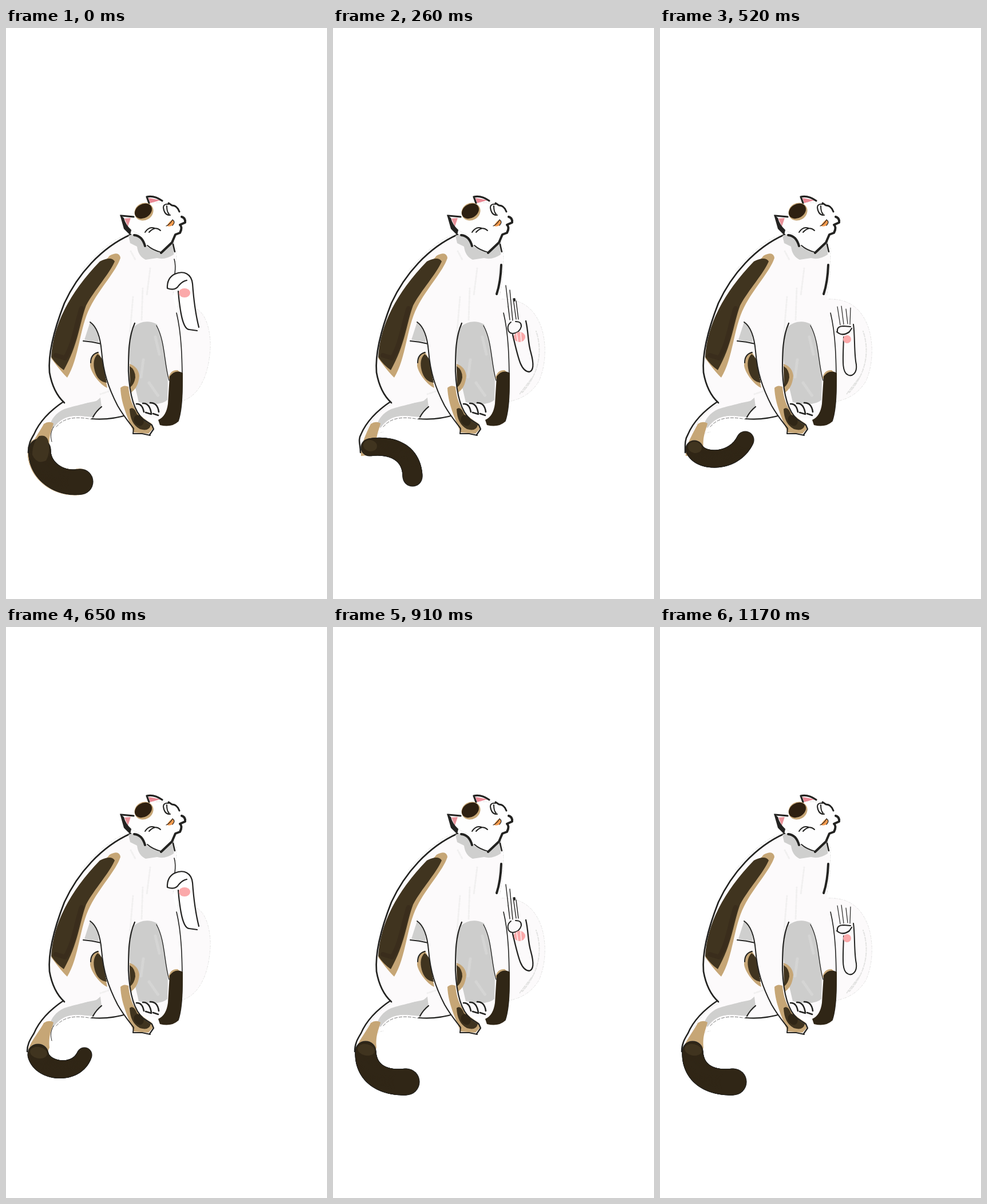
An HTML page with a canvas that plays this animation: 561 px wide and 998 px high, repeating every 1.3 s.

```html
<!DOCTYPE html>
<html lang="en">
<head>
<meta charset="utf-8">
<title>Scratching cat</title>
<style>
html, body { margin: 0; width: 100%; height: 100%; overflow: hidden; background: #fff }
canvas { display: block; width: 561px; height: 998px }
</style>
</head>
<body>
<canvas id="stage" width="561" height="998"></canvas>
<script>
const ctx = document.getElementById('stage').getContext('2d');
const INK = '#232321', FUR = '#fcfafb', DARK = '#302616', BROWN = '#40341f',
      TAN = '#c6a676', SHADE = '#cfcfce', FAINT = '#e2e2e1', PINK = '#fba9aa';
const STEP = 130;

function fill(color, d) {
  ctx.fillStyle = color;
  ctx.fill(new Path2D(d));
}
function line(d, width = 2, color = INK, dash = []) {
  ctx.strokeStyle = color;
  ctx.lineWidth = width;
  ctx.setLineDash(dash);
  ctx.stroke(new Path2D(d));
}
function oval(color, x, y, rx, ry, turn = 0) {
  ctx.fillStyle = color;
  ctx.beginPath();
  ctx.ellipse(x, y, rx, ry, turn, 0, 7);
  ctx.fill();
}
const grain = (d, width = 1, color = FAINT) => line(d, width, color, [1, 3, 3, 2]);
const mix = (a, b, t) => a.map((v, i) => v + (b[i] - v) * t);

// Tail tip: four Bezier points, then the radius at its root and at its end.
const hang = [57, 742, 57, 783, 91, 798, 128, 795, 18, 23];
const low = [59, 737, 57, 773, 93, 799, 130, 793, 19, 22];
const wave = [60, 738, 81, 757, 112, 742, 130, 786, 17, 18];
const arch = [64, 733, 103, 727, 138, 742, 139, 784, 15, 17];
const curl = [60, 736, 70, 760, 129, 762, 149, 720, 15, 15];
const hook = [56, 747, 62, 777, 122, 786, 137, 748, 18, 13];
const tails = [low, wave, arch, mix(arch, curl, .5), curl, hook, mix(hook, hang, .6), hang, hang, hang];

function tailTip(p, color, grow = 0, dx = 0) {
  for (let i = 0; i <= 60; i++) {
    const t = i / 60, u = 1 - t;
    const at = k => u * u * u * p[k] + 3 * u * u * t * p[k + 2] + 3 * u * t * t * p[k + 4] + t * t * t * p[k + 6];
    const r = p[8] + (p[9] - p[8]) * t + grow;
    oval(color, at(0) + dx, at(1), r, r);
  }
}

function drawTail(step) {
  const p = tails[step], left = p[0] - p[8] - 1;
  const edge = `C75 670 57 691 49 710 C43 720 ${left} 728 ${left} 742`;
  fill(FUR, `M102 652 ${edge} L74 738 C73 715 82 698 98 687 C118 677 137 682 154 682 L165 648Z`);
  fill(SHADE, 'M165 646 C150 655 120 660 102 666 C86 673 80 684 76 694 L83 699 C94 683 108 677 128 678 L152 680 L168 663Z');
  fill(TAN, `M66 692 Q75 686 83 691 C80 704 74 714 76 735 L${p[0] + 16} 745 L${left + 1} 748 C${left} 730 57 710 66 692Z`);
  if (step === 0) tailTip(p, TAN, 1, -1);
  tailTip(p, INK, .6);
  tailTip(p, DARK, -.6);
  if (step === 0) fill(BROWN, 'M58 713 Q71 710 74 722 Q78 742 70 756 Q54 764 46 746 Q46 725 58 713Z');
  else oval(BROWN, p[0] + 1, p[1] - 3, p[8] - 3, 10, .2);
  line('M102 652 ' + edge, 2.5);
  if (step % 5) grain('M104 657 C80 668 65 688 57 705 M79 708 L88 706');
  else line('M83 697 C77 708 78 715 80 723', 1);
  line('M88 697 C100 682 120 678 150 684', 1, '#777', [5, 3]);
}

function drawBelly(pose) {
  const d = pose < 2
    ? `M300 470 L${pose ? 339 : 333} ${pose ? 466 : 491} C352 501 358 535 357 560 C354 613 334 645 307 652Z`
    : 'M291 474 C330 472 352 490 364 523 C373 550 373 587 360 617 C347 639 328 649 307 653Z';
  fill(FUR, d);
  grain(d);
  if (pose > 1) grain('M355 530 C365 560 364 600 330 638 M349 610 L326 640', 2);
}

function drawBody() {
  fill(FUR, 'M216 362 C150 395 95 470 80 560 C72 600 85 640 104 656 Q130 660 165 650 L150 682 L188 684 L222 678 L270 684 L306 660 C310 580 307 530 299 495 L291 468 C296 440 298 400 293 376 L243 378Z');
  grain('M213 361 C185 368 155 398 132 424 M298 385 L297 430 L292 466');
  grain('M239 455 L237 510 M222 470 L216 540 M252 420 L246 468 M218 390 L226 405 M165 640 L200 628', 3, '#f1f0f0');

  fill(TAN, 'M181 398 Q198 389 200 402 C192 426 165 453 147 488 C128 525 128 577 107 611 Q97 602 79 577 Q94 500 181 398Z');
  fill(BROWN, 'M164 408 Q184 398 190 408 C180 431 155 457 140 485 C128 518 126 554 101 598 Q88 589 79 575 Q84 491 164 408Z');
  line('M132 490 C122 520 118 555 103 577 L87 572', 8, '#3a2d1c');
  line('M218 361 C166 384 125 431 102 481 C86 522 73 565 76 602 C81 630 91 645 102 655', 2.7);

  // Haunch
  fill(SHADE, 'M147 514 C157 520 162 535 162 549 L137 545Z');
  line('M135 547 Q150 548 166 552', 2);
  fill(TAN, 'M160 566 C170 577 172 603 177 629 C166 625 149 604 147 590 Q147 570 160 566Z');
  fill(BROWN, 'M160 570 Q169 575 171 590 L176 620 Q160 618 155 599 Q150 580 160 570Z');
  line('M161 567 Q148 570 148 585', 2);
  fill(SHADE, 'M122 669 Q149 662 165 646 L167 663 L152 679Z');
  line('M167 662 Q158 669 152 680 M150 683 Q182 686 216 675', 2.2);

  // Shade between the front legs
  fill('#cdcdcc', 'M224 522 C238 508 266 511 272 528 C280 560 285 600 282 650 Q270 662 232 654 C225 620 211 580 216 546Z');
  line('M240 580 L236 610 M261 540 L268 570 M250 620 L266 643', 5, '#d5d5d4', [2, 3]);
  fill(TAN, 'M216 587 Q231 592 233 608 Q231 630 217 638Z');
  fill(BROWN, 'M216 591 Q226 597 226 611 Q224 623 217 628Z');

  // Left front leg
  fill(FUR, 'M147 514 C171 535 166 590 178 625 L222 708 L250 711 L257 698 C231 684 217 660 215 620 L215 560 L200 530Z');
  fill(TAN, 'M200 629 Q206 623 214 627 C217 658 227 675 254 691 L258 699 L249 709 L223 707 C217 690 201 660 200 629Z');
  fill(BROWN, 'M216 666 Q223 660 229 675 Q240 686 253 694 Q250 706 234 701 Q217 692 216 666Z');
  oval(DARK, 232, 686, 8, 10, -.6);
  line('M147 514 C160 523 165 542 167 565 C170 602 179 629 195 660 C207 681 219 694 223 700 L222 709 L238 709 L252 712', 2);
  line('M225 516 C214 540 214 570 214 600 C216 645 226 672 240 684 Q249 690 255 694 L258 701 L251 711', 2.2);

  // Toes
  line('M228 657 Q238 656 241 671 M239 656 Q251 655 254 674 M252 655 Q265 655 267 671 M244 672 L254 675 M257 674 L266 677', 2.6);

  // Right front leg
  fill(FUR, 'M263 520 C280 550 278 590 285 625 L308 620 C309 570 305 525 299 497Z');
  line('M263 520 C278 547 276 584 285 616', 1.3);
  line('M298 498 C307 535 308 580 308 625 Q308 667 301 687', 1.6);
  fill(TAN, 'M284 612 Q287 597 300 598 L308 605 L290 615Z');
  fill(DARK, 'M286 609 Q296 596 309 603 C309 635 308 666 301 688 Q289 699 269 694 L266 685 Q280 679 283 657Z');
}

function drawHead() {
  fill(SHADE, 'M214 363 Q229 357 241 370 L246 382 Q266 394 282 381 L294 372 L293 396 Q278 406 264 402 L244 405 Q231 399 229 382 L217 376Z');
  fill('#fefefe', 'M216 331 Q231 307 252 302 L275 304 L302 319 L313 335 L305 345 L304 359 L296 362 L289 377 L271 393 Q242 384 238 368 L217 359Z');
  grain('M222 326 L230 313 M258 305 L281 306 M219 354 L236 362');
  fill('#e9939b', 'M207 333 L218 332 L213 347Z');
  line('M201 328 L223 330', 3);
  fill(INK, 'M199 326 L206 332 Q209 344 219 353 L217 362 L206 351Z');
  fill('#e98894', 'M249 297 L270 301 L252 306Z');
  line('M250 306 L246 295 Q259 292 273 302', 3.2);
  oval(TAN, 241, 321, 17, 15, -.55);
  oval('#2e2011', 240, 320, 16, 12, -.55);

  line('M284 308 Q275 307 275 314 Q277 328 287 327 M281 311 Q281 322 285 325', 2);
  line('M284 306 L290 310 Q299 310 303 321', 3);
  line('M307 330 Q314 332 313 340 L304 344 Q309 348 304 358 L296 361 L290 375 L271 393', 4);
  line('M271 392 Q256 388 247 380', 1.8);
  fill('#f49a4d', 'M281 346 Q285 338 291 335 Q297 339 291 345 Q286 348 281 346Z');
  line('M280 346 Q287 343 291 335 Q297 339 291 345', 1.2);
  line('M243 357 Q250 346 260 350 M250 357 Q261 345 270 354', 2);
  line('M224 362 Q238 363 243 381', 4);
  line('M292 378 L295 391', 2.5);
}

const paws = [
  () => {
    line('M294 404 Q297 414 295 430', 1.5);
    fill('#fff', 'M295 430 C313 423 324 430 326 445 L337 525 L318 526 C306 505 304 484 301 458 L283 455 L284 440Z');
    line('M295 430 C311 423 324 430 326 447 C328 475 331 499 337 523', 2.2);
    line('M295 430 Q281 437 282 455 Q296 460 302 450 Q309 442 316 441', 2.2);
    line('M301 460 C304 496 309 526 320 527 L334 529', 2.2);
    oval(PINK, 312, 463, 10, 8);
  },
  () => {
    line('M295 412 Q294 444 285 466', 4);
    fill('#fff', 'M294 389 Q324 379 329 400 L334 450 L332 490 L312 489 L297 435 L287 400Z');
    line('M294 389 C313 382 326 386 329 402 C332 430 336 463 332 492', 2.2, DARK);
    line('M296 411 C296 440 306 470 311 488', 2.2, DARK);
    line('M309 504 L312 481 M314 484 V506 M323 509 V482 L328 480 L326 508 M331 482 L334 498', 2, DARK);
    line('M287 402 C284 388 308 384 312 399 Q311 411 296 410 Q289 409 287 402', 1.5, DARK);
    oval(PINK, 310, 416, 9, 8);
    line('M310 409 L311 425', 1.5, '#fff');
  },
  () => {
    line('M294 414 Q293 444 286 465', 4);
    line('M302 450 L309 510 L306 486 M309 458 L314 511 M320 477 L324 509 M315 473 L320 509', 1.4);
    oval(INK, 317, 475, 2, 3);
    line('M311 514 C303 520 304 533 314 534 Q326 533 329 522 Q330 513 319 513', 2);
    line('M337 512 C342 533 340 549 346 568 C352 590 350 599 343 601 C328 600 324 578 314 536', 2.3);
    oval(PINK, 326, 540, 10, 9);
    line('M321 534 L323 548 M328 532 L329 548', 1.3, '#fff');
  },
  () => {
    line('M294 414 Q293 444 286 465', 4);
    line('M310 487 L315 519 M317 486 L321 518 M325 491 L328 517 M333 489 L332 518', 1.2);
    line('M310 530 Q309 521 321 521 L333 522 M309 531 Q319 540 331 531 L335 525', 2.2);
    line('M338 518 C341 540 339 570 343 588 C345 604 335 610 328 606 C317 601 320 577 321 540', 2);
    oval(PINK, 327, 544, 7, 7);
  }
];
const scratch = [0, 1, 2, 1, 3];

function frame() {
  const step = Math.floor(performance.now() / STEP) % tails.length;
  const pose = scratch[step % scratch.length];
  ctx.lineCap = ctx.lineJoin = 'round';
  fill('#fff', 'M0 0H561V998H0Z');
  drawTail(step);
  drawBelly(pose);
  drawBody();
  drawHead();
  paws[pose]();
  requestAnimationFrame(frame);
}
frame();
</script>
</body>
</html>
```
